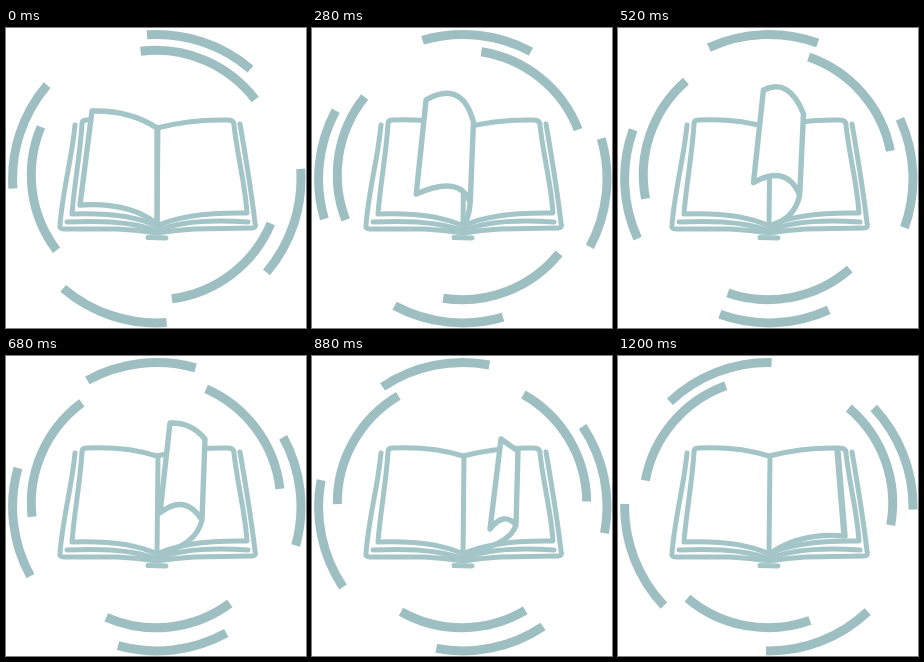
Recreate the animation shown at these times as an HTML page. Size 300 px wide and 300 px high, loop 1.24 s.

```html
<!DOCTYPE html>
<html lang="en">
<head>
<meta charset="utf-8">
<title>Book loader</title>
<style>
html, body { margin: 0; width: 100%; height: 100%; overflow: hidden; background: #fff; }
svg { display: block; width: 100vw; height: 100vh; }
path { fill: none; stroke-linecap: round; stroke-linejoin: round; }
#rings path { stroke: #9dbfc1; stroke-width: 9; stroke-linecap: butt; }
#book path { stroke: #a3c5c7; stroke-width: 5; }
#book #sheet { fill: #fff; stroke: none; }
#book #edges { stroke-width: 5.4; }
</style>
</head>
<body>
<svg viewBox="0 0 300 300">
  <g id="rings"><path id="outer"/><path id="inner"/></g>
  <g id="book">
    <!-- cover -->
    <path d="M69 97C66 130 57 160 54 197Q53 201 58 201L112 201Q132 202 151 205Q170 202 188 201L246 200Q251 200 249 195C245 160 239 125 234 96"/>
    <path d="M142 209.5L160 210"/>
    <!-- page block -->
    <path d="M61 194Q122 191 151 203Q180 190 242 194"/>
    <path d="M151 100Q120 90 80 92Q76 92 76 96C74 128 68 158 66 186Q122 184 151 198Q180 184 241 185C239 155 231 126 228 97Q228 92 222 92Q185 91 151 100"/>
    <path d="M152 100L151 198"/>
    <path id="sheet"/><path id="edges"/>
  </g>
</svg>
<script>
const LOOP = 1240, STEP = 40;
const times = [0, 160, 400, 680, 880, 1040, 1200];
const outerTurn = [-93.9, -101, -110.9, -118.8, -123.8, -128.4, -133.3];
const innerTurn = [22.9, 32.2, 44.8, 53.7, 59.5, 64.2, 70.4];

// turning page: corners and bends, one x and y track each
const page = {
  topLeft: { x: [86, 98, 131, 164, 189, 209, 219], y: [83, 82, 63, 67, 83, 83, 94] },
  topBend: { x: [124, 140, 160, 185, 197, 214, 220], y: [82, 66, 43, 66, 89, 89, 94] },
  topRight: { x: [151, 151, 174, 199, 206, 218, 220], y: [100, 98, 90, 83, 95, 95, 95] },
  lowRight: { x: [151, 149, 170, 196, 204, 214, 227], y: [196, 180, 171, 164, 169, 169, 180] },
  lowLeft: { x: [74, 88, 121, 154, 178, 200, 226], y: [177, 176, 157, 157, 173, 173, 180] },
  lowBend: { x: [124, 136, 160, 179, 192, 208, 226], y: [174, 157, 139, 137, 155, 154, 180] },
  curl: { x: [151, 150, 166, 190, 198, 205, 182], y: [197, 190, 192, 190, 189, 189, 176] }
};

const draw = (id, d) => document.getElementById(id).setAttribute("d", d);

// smooth curve through values given at the key times
function slope(v, i) {
  const a = Math.max(i - 1, 0), b = Math.min(i + 1, v.length - 1);
  return (v[b] - v[a]) / (times[b] - times[a]);
}
function at(v, t) {
  let i = 0;
  while (i < times.length - 2 && t >= times[i + 1]) i++;
  const h = times[i + 1] - times[i], u = (t - times[i]) / h;
  const w = u * u * (3 - 2 * u);
  return v[i] * (1 - w) + v[i + 1] * w
    + h * u * (1 - u) * ((1 - u) * slope(v, i) - u * slope(v, i + 1));
}

function arcs(cx, cy, r, start, span, count) {
  const point = deg => {
    const a = deg * Math.PI / 180;
    return (cx + r * Math.cos(a)).toFixed(2) + " " + (cy + r * Math.sin(a)).toFixed(2);
  };
  let d = "";
  for (let i = 0; i < count; i++) {
    const a = start + i * 360 / count;
    d += `M${point(a)}A${r} ${r} 0 0 1 ${point(a + span)}`;
  }
  return d;
}

function render(t) {
  draw("outer", arcs(150.8, 150.7, 144.2, at(outerTurn, t), 44.4, 4));
  draw("inner", arcs(150, 147, 124.7, at(innerTurn, t), 59.8, 3));

  const p = {};
  for (const key in page) {
    p[key] = at(page[key].x, t).toFixed(2) + " " + at(page[key].y, t).toFixed(2);
  }
  const face = `M${p.lowLeft}L${p.topLeft}Q${p.topBend} ${p.topRight}`
    + `L${p.lowRight}Q${p.lowBend} ${p.lowLeft}Z`;
  draw("sheet", face);
  draw("edges", `${face}M${p.lowRight}Q${p.curl} 151.5 198`);
}

const origin = performance.now();
function tick() {
  const t = (performance.now() - origin) % LOOP;
  render(Math.floor(t / STEP) * STEP);
  requestAnimationFrame(tick);
}
render(0);
requestAnimationFrame(tick);
</script>
</body>
</html>
```
